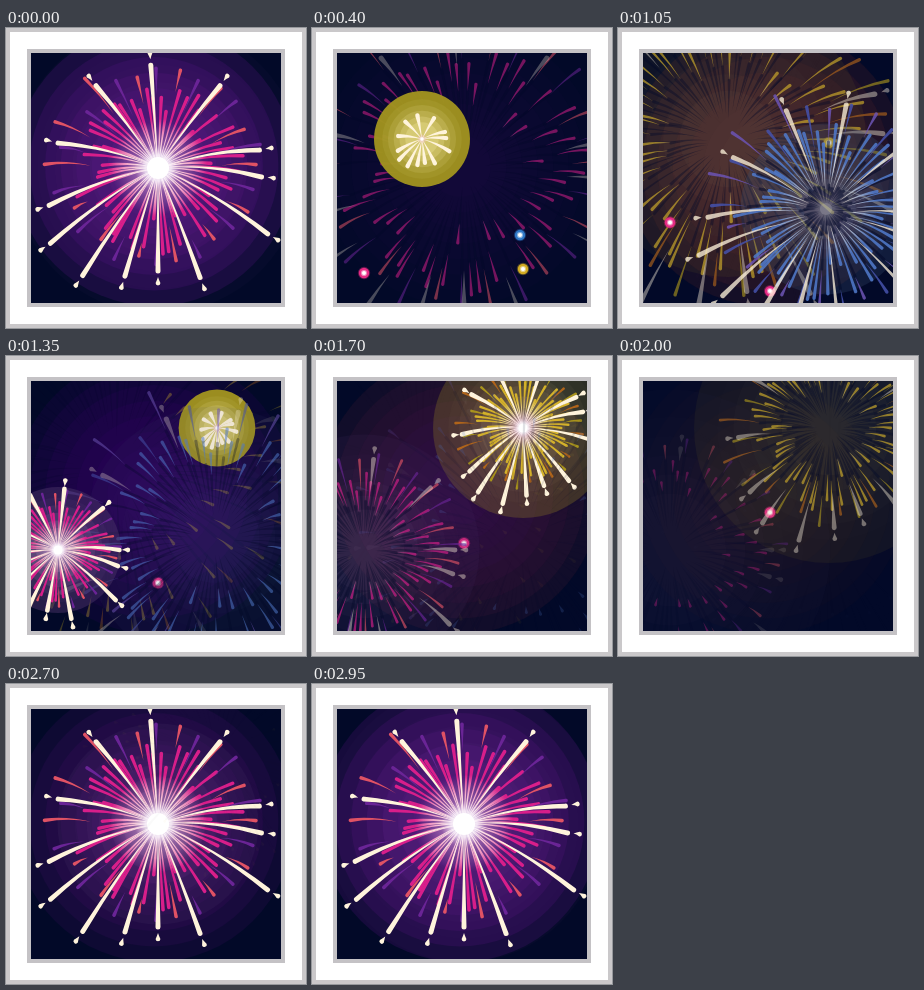
These frames come from a looping animation (300 by 300 pixels, 3 s). An HTML page with a canvas:

```html
<!DOCTYPE html>
<html lang="en">
<head>
<meta charset="utf-8">
<title>Fireworks</title>
<style>
  html, body { margin: 0; width: 100%; height: 100%; overflow: hidden; background: #fff; }
  canvas { display: block; width: 300px; height: 300px; }
</style>
</head>
<body>
<canvas id="stage" width="300" height="300"></canvas>
<script>
const ctx = document.getElementById('stage').getContext('2d');
const LOOP = 3000, STEP = 50, FADE = 1100, NAVY = '#020928', CREAM = '#fff4dc';
const RAD = Math.PI / 180;
const clamp = v => Math.min(1, Math.max(0, v));

const PINK = { hues: ['#d81e8a', '#e05264', '#6a2496'], spark: '#e62a84', disc: '#453064', light: '#c9a0d0' };
const GOLD = { hues: ['#d4b12a', '#b0641a', '#a8931c'], spark: '#d2ab22', disc: '#a3951f', light: '#efe49a' };
const BLUE = { hues: ['#4f78c8', '#6a52b0', '#4450a8'], spark: '#2f78c8', disc: '#3a4d6e', light: '#6f8cba' };

// start: when it bursts, full: ms until the tails let go of the centre,
// flight and ease: how its rocket rises beforehand
const BURSTS = [
  { ...PINK, x: 152, y: 140, start: 2200, full: 800, size: 1, turn: 0, core: 13, sky: '#54127c', flight: 1246, ease: 1.15 },
  { ...GOLD, x: 110, y: 111, start: 300, full: 450, size: 1.2, turn: -7, core: 6, sky: '#6e340c', flight: 240, ease: 1.5 },
  { ...GOLD, x: 211, y: 72, start: 1270, full: 430, size: .6, turn: -20, core: 9, sky: '#321c1a', flight: 1045, ease: 1 },
  { ...BLUE, x: 208, y: 181, start: 650, full: 300, size: .9, turn: 15, core: 7, sky: '#3a1c30', flight: 516, ease: 1.77 },
  { ...PINK, x: 52, y: 194, start: 1100, full: 300, size: .6, turn: 10, core: 9, sky: '#2e0566', flight: 909, ease: 1.77 }
];

const RAYS = [-94, -53, -10, 5, 31, 69, 90, 107, 125, 145, 161, -166, -127].map(angle => {
  const a = angle * RAD, slant = Math.max(0, Math.sin(a)) * Math.abs(Math.cos(a)) * 2;
  return { angle, length: 104 + 32 * slant ** 2 };
});

let seed = 11;
const rand = (lo, hi) => lo + (hi - lo) * (seed = seed * 16807 % 2147483647) / 2147483647;
const STREAKS = Array.from({ length: 84 }, (_, i) => {
  const outer = i % 3 === 0;
  return {
    angle: i * 360 / 84 + rand(-2, 2),
    hue: outer ? 1 + i / 3 % 2 : 0,
    start: outer ? rand(50, 80) : 0,
    end: outer ? rand(90, 116) : rand(50, 86)
  };
});

function circle(x, y, r, fill, alpha = 1) {
  ctx.globalAlpha = alpha;
  ctx.fillStyle = fill;
  ctx.beginPath();
  ctx.arc(x, y, r, 0, 7);
  ctx.fill();
}

function radial(r, ...stops) {
  const g = ctx.createRadialGradient(0, 0, 0, 0, 0, r);
  stops.forEach(([at, color]) => g.addColorStop(at, color));
  return g;
}

// A tapered stroke, pointed inside, round outside and sagging a little
function streak(deg, r0, r1, width, fill, alpha) {
  const a = deg * RAD, c = Math.cos(a), s = Math.sin(a), h = width / 2;
  const mx = c * (r0 + r1) / 2, my = s * (r0 + r1) / 2 - Math.abs(c) * (r1 - r0) * .09;
  ctx.globalAlpha = alpha;
  ctx.fillStyle = fill;
  ctx.beginPath();
  ctx.moveTo(c * r0, s * r0);
  ctx.quadraticCurveTo(mx + s * h * .4, my - c * h * .4, c * r1 + s * h, s * r1 - c * h);
  ctx.arc(c * r1, s * r1, h, a - Math.PI / 2, a + Math.PI / 2);
  ctx.quadraticCurveTo(mx - s * h * .4, my + c * h * .4, c * r0, s * r0);
  ctx.fill();
}

// State of a burst: tails loosen and drift on once it is full
function pose(b, t) {
  const age = (t - b.start + LOOP) % LOOP, past = Math.max(0, age - b.full);
  const open = Math.min(age, 100) / 500 + .8 * (1 - (1 - clamp((age - 100) / (b.full - 100))) ** 8);
  const tail = 1 - Math.exp(-past / 300);
  return {
    age, tail,
    scale: b.size * (age < 100 ? open / b.size : open) + .45 * tail,
    alpha: clamp(1 - past / FADE) ** 1.4,
    glow: clamp((age - 150) / (b.full - 150)) * clamp(1 - past / 450)
  };
}

function drawGlow(b, { glow }) {
  if (!glow) return;
  for (let i = 0; i < 8; i++) circle(148, 138, 140 * (1 - i / 9), b.sky, .26 * glow);
}

function drawDisc(b, age) {
  const alpha = age < 100 ? .95 : .95 * Math.exp((100 - age) / 250);
  const r = Math.min(age, 100) * .48 + Math.max(0, age - 150) * .15;
  if (alpha < .03) return;
  circle(0, 0, r, b.disc, alpha);
  for (let i = 1; i < 6; i++) circle(0, 0, r * (.95 - i * .12), b.light, alpha * i * .07);
}

function drawCore(size, alpha) {
  if (alpha <= 0) return;
  circle(0, 0, size * 3.6, radial(size * 3.6, [0, '#fff'], [.28, 'rgba(255,245,255,.85)'],
    [.5, 'rgba(255,200,240,.35)'], [1, 'rgba(255,180,240,0)']), alpha);
  circle(0, 0, size * .85, '#fff', alpha);
}

function drawStreaks(b, { scale, tail, alpha }) {
  const fills = b.hues.map(hue => radial(90 * scale, [0, '#fff'], [.2, CREAM], [.55, hue], [1, hue]));
  for (const s of STREAKS) {
    const deg = s.angle + b.turn, end = s.end * scale * (1 + tail * .15);
    const start = Math.max(s.start * scale, end * tail);
    if (tail > .2) streak(deg, start * .35, start, 3, NAVY, alpha * .6);
    streak(deg, start, end, 1 + 2.6 * Math.min(scale, 1.2) * (1 - tail * .35), fills[s.hue], alpha);
  }
}

function drawRays(b, { scale, tail, alpha }) {
  for (const { angle, length } of RAYS) {
    const end = length * scale, deg = angle + b.turn, a = deg * RAD;
    const gap = end + 9 * Math.min(scale, 1.1);
    streak(deg, end * tail, end - 1, 4.2 + scale * .8, CREAM, alpha ** 2);
    if (scale > .4) streak(deg, gap - 4, gap + 2, 4.8, CREAM, alpha ** 2);
  }
}

function drawBurst(b, p) {
  if (!p.alpha || !p.scale) return;
  ctx.save();
  ctx.translate(b.x, b.y);
  drawDisc(b, p.age);
  if (p.scale > .3) drawStreaks(b, p);
  drawRays(b, p);
  drawCore(b.core * Math.min(p.scale, 1.1), 1 - p.tail * 3);
  ctx.restore();
}

function drawRocket(b, t) {
  const left = (b.start - t) / b.flight;
  if (left <= 0 || left > 1) return;
  const y = b.y + (275 - b.y) * left ** b.ease;
  circle(b.x, y, 6.2, b.spark, .35);
  circle(b.x, y, 5.2, b.spark);
  circle(b.x, y, 3.1, '#fff', .45);
  circle(b.x, y, 2, '#fff');
}

function panel(fill, inset) {
  ctx.globalAlpha = 1;
  ctx.fillStyle = fill;
  ctx.fillRect(inset, inset, 300 - inset * 2, 300 - inset * 2);
}

function draw(now) {
  let t = Math.floor(now % LOOP / STEP) * STEP;
  if (t === 1650 || t === 2450) t -= STEP; // two held poses
  panel('#cac8ca', 0);
  panel('#fff', 4);
  panel('#c4c2c5', 21);
  panel(NAVY, 25);
  ctx.save();
  ctx.beginPath();
  ctx.rect(25, 25, 250, 250);
  ctx.clip();
  const poses = BURSTS.map(b => pose(b, t));
  BURSTS.forEach((b, i) => drawGlow(b, poses[i]));
  BURSTS.forEach((b, i) => {
    drawBurst(b, poses[i]);
    drawRocket(b, t);
  });
  ctx.restore();
}

const begin = performance.now();
function tick() {
  draw(performance.now() - begin);
  requestAnimationFrame(tick);
}
tick();
</script>
</body>
</html>
```
